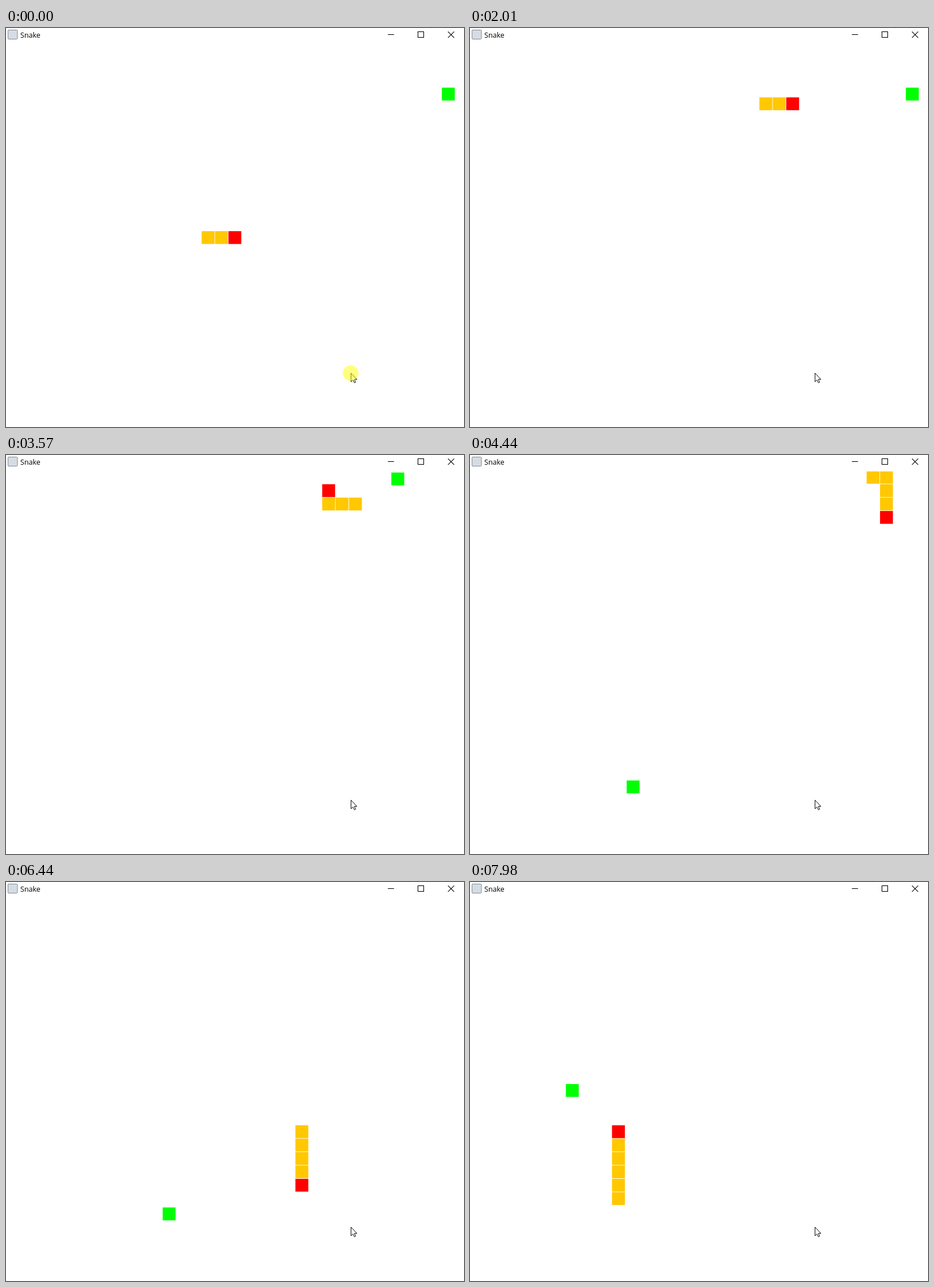
Animation of 801x699 px, one loop 8 s. Source, as an HTML page:

```html
<!DOCTYPE html>
<html lang="en">
<head>
<meta charset="utf-8">
<title>Snake</title>
<style>
  html, body { margin: 0; width: 100%; height: 100%; overflow: hidden; background: #fff; }
  svg { display: block; }
</style>
</head>
<body>
<svg width="801" height="699" viewBox="0 0 801 699">
  <defs>
    <clipPath id="panel"><rect y="28.8" width="801" height="671"/></clipPath>
  </defs>
  <rect x="3.5" y="3.5" width="16.5" height="16" rx="1.5" fill="#d5dce4" stroke="#828a94"/>
  <text x="25" y="17" font-family="'Open Sans', 'Noto Sans', sans-serif" font-size="12.6">Snake</text>
  <g fill="none" stroke="#000" stroke-width="1.1">
    <path d="M667.8 11.5H678.6"/>
    <rect x="720.5" y="6.5" width="10" height="10"/>
    <path d="M773 6.3L783.8 17.1M783.8 6.3L773 17.1"/>
  </g>
  <g id="board" clip-path="url(#panel)"></g>
  <path d="M603.4 604.6V619.8L606.9 616.6L609.3 621.6L611.5 620.6L609.3 615.6H613.7Z"
        fill="#fff" stroke="#000" stroke-width="1"/>
  <circle id="halo" cx="602.8" cy="604.6" r="13.7" fill="#ff0" fill-opacity=".5"/>
</svg>
<script>
const LOOP = 8000, HALO_END = 150;
const STEP = 23.4375, SIZE = 22.5, X0 = 389, Y0 = 355.9;
const DIRS = { U: [0, -1], D: [0, 1], L: [-1, 0], R: [1, 0] };
const FOODS = [[762.3, 104.5], [674, 30.7], [274, 570.2], [167.7, 354]];

// [time of first move, time of last move, moves]
const RUNS = [
  [710, 1310, 'U9'], [1410, 1410, 'U1'], [1470, 1540, 'R2'], [1640, 1640, 'R2'],
  [1780, 2570, 'R11'], [2630, 2700, 'R1U1'], [2780, 3430, 'U1L8'],
  [3480, 4030, 'L1U2R5'], [4110, 4110, 'R2'],
  [4270, 4440, 'D3'], [4490, 5040, 'D7L1'], [5120, 5120, 'L1'], [5210, 5210, 'L2'],
  [5350, 5350, 'L1'], [5430, 5430, 'L2'],
  [5580, 6370, 'L2D9'], [6440, 6440, 'D2'],
  [6590, 7370, 'D2L9'], [7470, 7980, 'L2U6']
];

const expand = s => s.replace(/([UDLR])(\d+)/g, (_, d, n) => d.repeat(n));
const place = ([c, r]) => [X0 + c * STEP, Y0 + r * STEP];
const touches = (a, b) => Math.abs(a[0] - b[0]) < SIZE && Math.abs(a[1] - b[1]) < SIZE;

// Play the game once and keep the state after every move
function simulate() {
  let cells = [[0, 0], [-1, 0], [-2, 0]], food = 0, grow = false;
  const states = [{ t: 0, cells, food }];
  for (const [from, to, code] of RUNS) {
    const moves = expand(code), gap = (to - from) / Math.max(1, moves.length - 1);
    [...moves].forEach((m, i) => {
      const [dx, dy] = DIRS[m], [c, r] = cells[0];
      cells = [[c + dx, r + dy], ...(grow ? cells : cells.slice(0, -1))];
      grow = touches(place(cells[0]), FOODS[food]);
      if (grow) food++;
      states.push({ t: Math.round(from + i * gap), cells, food });
    });
  }
  return states;
}

const states = simulate();
const board = document.getElementById('board');
const halo = document.getElementById('halo');
const square = ([x, y], fill) =>
  `<rect x="${x}" y="${y}" width="${SIZE}" height="${SIZE}" fill="${fill}"/>`;
let shown = null;

function draw(t) {
  halo.style.display = t < HALO_END ? '' : 'none';
  const state = states.filter(s => s.t <= t).pop();
  if (state === shown) return;
  shown = state;
  board.innerHTML = square(FOODS[state.food], '#0f0') +
    state.cells.map((c, i) => square(place(c), i ? '#ffc800' : '#f00')).join('');
}

function tick() {
  draw(performance.now() % LOOP);
  requestAnimationFrame(tick);
}
tick();
</script>
</body>
</html>
```
